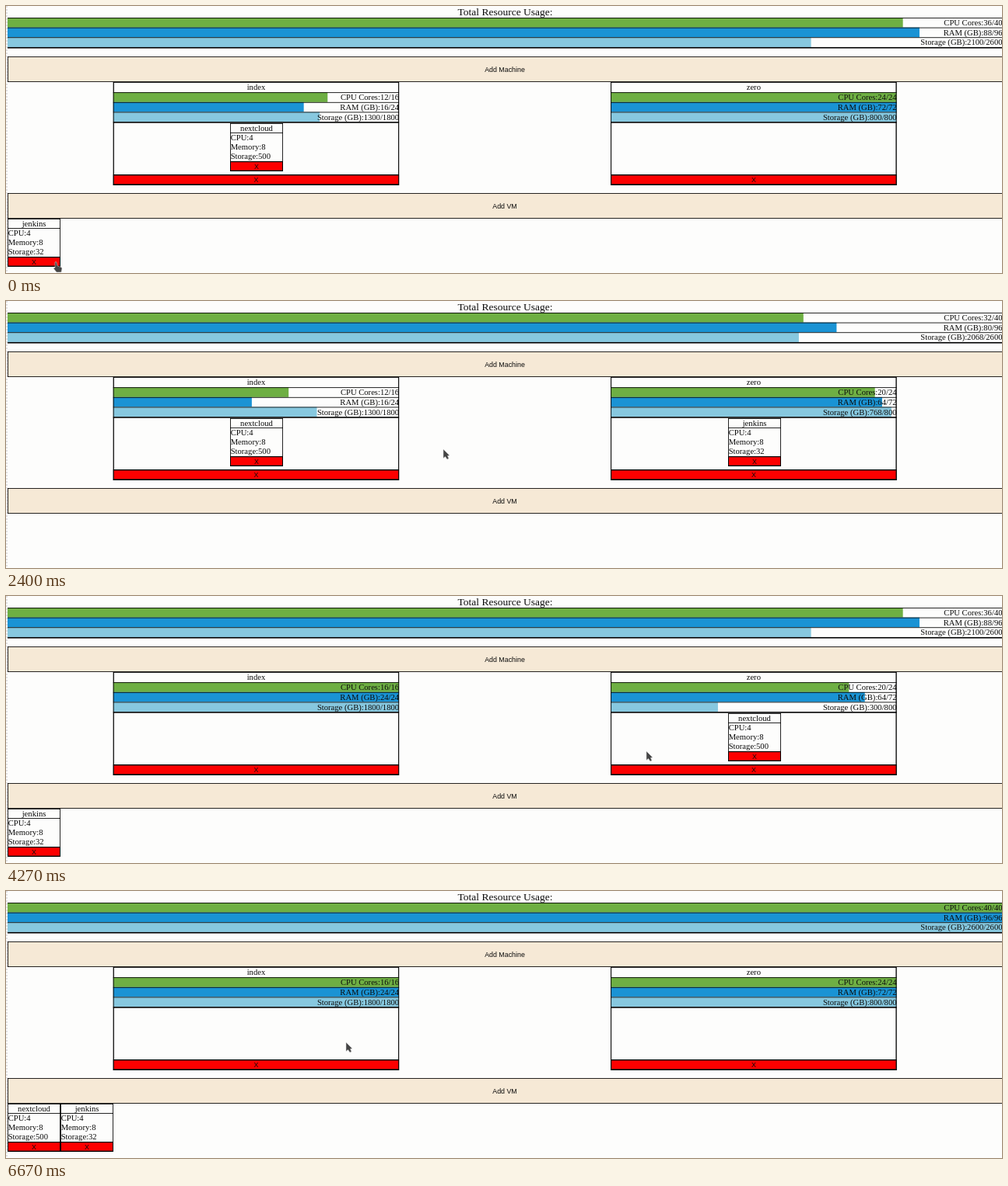
Recreate the animation shown at these times as an HTML page. Size 1280 by 344 pixels, loop 6740 ms.

```html
<!DOCTYPE html>
<html lang="en">
<head>
<meta charset="utf-8">
<title>Resource planner</title>
<style>
  html, body { margin: 0; width: 100%; height: 100%; overflow: hidden; background: #fdfdfc; }
  svg { display: block; width: 1280px; height: 344px; }
  text { font: 10.62px "Liberation Serif", "Times New Roman", serif; fill: #0c0c0c; white-space: pre; }
  .title { font-size: 13.5px; }
  .button { font: 8.87px "Liberation Sans", Arial, sans-serif; }
</style>
</head>
<body>
<svg id="stage" viewBox="0 0 1280 344"></svg>
<script>
const LOOP = 6740, STEP = 1000 / 15, EASE_STEPS = 4.4;
const COLORS = ['#6eaf43', '#1a93d4', '#87c8df'];
const LABELS = ['CPU Cores', 'RAM (GB)', 'Storage (GB)'];
const PAPER = '#fdfdfc', INK = '#000', RED = '#fd0000', CREAM = '#f6e9d6';
const LINE = .85, ROW = 12.65;
const stage = document.getElementById('stage');

const VMS = {
  nextcloud: [4, 8, 500],
  jenkins: [4, 8, 32]
};
const CAPACITY = { index: [16, 24, 1800], zero: [24, 72, 800] };

// Where each machine lives, in steps of 1/15 s
const STATES = [
  { at: 0, index: ['nextcloud'], zero: [], pool: ['jenkins'] },
  { at: 15, index: ['nextcloud', 'jenkins'], zero: [], pool: [] },
  { at: 34, index: ['nextcloud'], zero: ['jenkins'], pool: [] },
  { at: 49, index: [], zero: ['jenkins', 'nextcloud'], pool: [] },
  { at: 56, index: [], zero: ['nextcloud'], pool: ['jenkins'] },
  { at: 76, index: [], zero: ['jenkins'], pool: ['nextcloud'] },
  { at: 90, index: [], zero: [], pool: ['nextcloud', 'jenkins'] }
];

// The dragged card is seen only from "show" to "hide"
const DRAGS = [
  { from: 5, to: 15, vm: 'jenkins', dx: 63, dy: 25 },
  { from: 22, to: 34, vm: 'jenkins', dx: 50, dy: 37, show: 27 },
  { from: 40, to: 49, vm: 'nextcloud', dx: 37, dy: 39 },
  { from: 53, to: 56, vm: 'jenkins', dx: 18, dy: 35 },
  { from: 70, to: 76, vm: 'nextcloud', dx: 22, dy: 34, hide: 75 },
  { from: 76, to: 78, vm: 'jenkins', dx: 22, dy: 34, hide: 76 },
  { from: 82, to: 90, vm: 'jenkins', dx: 30, dy: 35 }
];

const PATH = [
  [0, 64, 330], [3, 64, 322], [5, 65, 299], [9, 220, 235], [12, 360, 203],
  [15, 410, 190], [18, 425, 186], [22, 430, 188], [26, 538, 188], [30, 760, 195],
  [34, 960, 190], [36, 562, 191], [38, 360, 188], [40, 325, 190], [44, 640, 200],
  [49, 1052, 190], [51, 920, 182], [52, 854, 182], [53, 854, 186], [54, 440, 250],
  [55, 24, 295], [56, 24, 302], [58, 100, 290], [62, 700, 210], [66, 945, 190],
  [70, 950, 185], [73, 948, 200], [76, 940, 252], [80, 958, 188], [82, 958, 186],
  [85, 700, 240], [88, 44, 318], [90, 100, 310], [93, 110, 328], [97, 300, 250], [100, 437, 195]
];

function add(parent, tag, attrs) {
  const node = document.createElementNS('http://www.w3.org/2000/svg', tag);
  for (const key in attrs) node.setAttribute(key, attrs[key]);
  parent.append(node);
  return node;
}

const rect = (parent, x, y, width, height, fill) => add(parent, 'rect', { x, y, width, height, fill });

function label(parent, x, y, words, anchor = 'start', cls = '') {
  const node = add(parent, 'text', { x, y, 'text-anchor': anchor, class: cls });
  node.textContent = words;
  return node;
}

function frame(parent, x, y, w, h, fill) {
  rect(parent, x, y, w, h, INK);
  rect(parent, x + LINE, y + LINE, w - 2 * LINE, h - 2 * LINE, fill);
}

// Three usage rows; returns a function that sets the bars and the numbers
function meters(x, y, width) {
  const rows = LABELS.map((name, i) => {
    const top = y + i * ROW;
    const bar = rect(stage, x, top, width, ROW, COLORS[i]);
    rect(stage, x, top, width, LINE, INK);
    return { bar, text: label(stage, x + width, top + 10.1, '', 'end') };
  });
  rect(stage, x, y + 3 * ROW, width, 1.6, INK);
  return (fill, free, cap) => rows.forEach(({ bar, text }, i) => {
    bar.setAttribute('width', width * fill[i]);
    text.textContent = `${LABELS[i]}:${free[i]}/${cap[i]}`;
  });
}

function wideButton(y, words) {
  frame(stage, 2, y, 1300, 33, CREAM);
  label(stage, 641, y + 20, words, 'middle', 'button');
}

function machine(x, name) {
  const width = 367.3;
  frame(stage, x, 98, width, 133, PAPER);
  label(stage, x + width / 2, 108.2, name, 'middle');
  const set = meters(x, 111.2, width);
  rect(stage, x, 98, LINE, 133, INK);
  rect(stage, x + width - LINE, 98, LINE, 133, INK);
  rect(stage, x, 217, width, 14, INK);
  rect(stage, x + 1, 218.4, width - 2, 10.9, RED);
  label(stage, x + width / 2, 227, 'X', 'middle', 'button');
  return set;
}

function card(name) {
  const [cpu, memory, storage] = VMS[name];
  const g = add(stage, 'g', {});
  frame(g, 0, 0, 68, 62, PAPER);
  label(g, 34, 9.7, name, 'middle');
  rect(g, 0, 12, 68, LINE, INK);
  [`CPU:${cpu}`, `Memory:${memory}`, `Storage:${storage}`]
    .forEach((line, i) => label(g, .7, 22.4 + i * 12, line));
  rect(g, 0, 49, 68, 13, INK);
  rect(g, 1, 50.2, 66, 10.4, RED);
  label(g, 34, 58.6, 'X', 'middle', 'button');
  return g;
}

function cursor(d) {
  return add(stage, 'path', { d, fill: '#444', stroke: '#d8d8d8', 'stroke-width': .5, 'stroke-linejoin': 'round' });
}

add(stage, 'path', { d: 'M1 0V344', stroke: '#c4c4c8', 'stroke-dasharray': '2 2' });
label(stage, 641.5, 11.8, 'Total Resource Usage:', 'middle', 'title');
const setters = { total: meters(2, 15, 1278.5) };
wideButton(65, 'Add Machine');
setters.index = machine(137.8, 'index');
setters.zero = machine(777.2, 'zero');
wideButton(241, 'Add VM');
const cards = { nextcloud: card('nextcloud'), jenkins: card('jenkins') };
const cursors = {
  point: cursor('M-1 0Q0-1 1 0L2 5L7 6.5L8 8L7 13H1L-3 8L-1 7Z'),
  grab: cursor('M-5-2L-3-4L-2-5H0L1-5H3L5-3V2L3 5.5H-3L-5 2Z'),
  arrow: cursor('M0 0V11.5L2.5 9.5L5 13L7 12L5.5 8.5L8 8Z')
};

const sum = (a, b) => a.map((v, i) => v + b[i]);
const capacity = { ...CAPACITY, total: sum(CAPACITY.index, CAPACITY.zero) };

function freeIn(state, place) {
  if (place === 'total') return sum(freeIn(state, 'index'), freeIn(state, 'zero'));
  return state[place].reduce((left, vm) => left.map((v, i) => v - VMS[vm][i]), CAPACITY[place]);
}

function pointAt(step) {
  const i = Math.max(1, PATH.findIndex(p => p[0] >= step));
  const [a, x0, y0] = PATH[i - 1], [b, x1, y1] = PATH[i];
  const k = (step - a) / (b - a);
  return [x0 + (x1 - x0) * k, y0 + (y1 - y0) * k];
}

function place(vm, x, y, opacity = 1) {
  cards[vm].setAttribute('transform', `translate(${x} ${y})`);
  cards[vm].setAttribute('opacity', opacity);
}

function draw(step) {
  const now = STATES.findLastIndex(s => s.at <= step);
  const state = STATES[now], before = STATES[Math.max(0, now - 1)];
  const k = Math.min(1, (step - state.at) / EASE_STEPS);

  for (const name in setters) {
    const cap = capacity[name], free = freeIn(state, name), old = freeIn(before, name);
    setters[name](cap.map((c, i) => (old[i] + (free[i] - old[i]) * k) / c), free, cap);
  }

  const drag = DRAGS.find(d => step >= d.from && step < d.to);
  const resting = list => list.filter(vm => !drag || vm !== drag.vm);
  [['index', 137.8], ['zero', 777.4]].forEach(([name, x]) => {
    const list = resting(state[name]), slot = 367.3 / list.length;
    list.forEach((vm, i) => place(vm, Math.ceil(x + slot * (i + .5) - 34), 151));
  });
  resting(state.pool).forEach((vm, i) => place(vm, 2 + 68 * i, 274));

  const [x, y] = pointAt(step).map(Math.round);
  if (drag) {
    const seen = step >= (drag.show ?? drag.from) && step < (drag.hide ?? drag.to);
    place(drag.vm, x - drag.dx, y - drag.dy, seen ? .75 : 0);
  }
  const kind = drag ? 'grab' : step < 5 ? 'point' : 'arrow';
  for (const name in cursors) {
    cursors[name].setAttribute('transform', `translate(${x} ${y})`);
    cursors[name].setAttribute('visibility', name === kind ? 'visible' : 'hidden');
  }
}

const start = performance.now();
function tick() {
  const t = Math.max(0, performance.now() - start) % LOOP;
  draw(Math.min(100, Math.floor((t + 4) / STEP)));
  requestAnimationFrame(tick);
}
tick();
</script>
</body>
</html>
```
